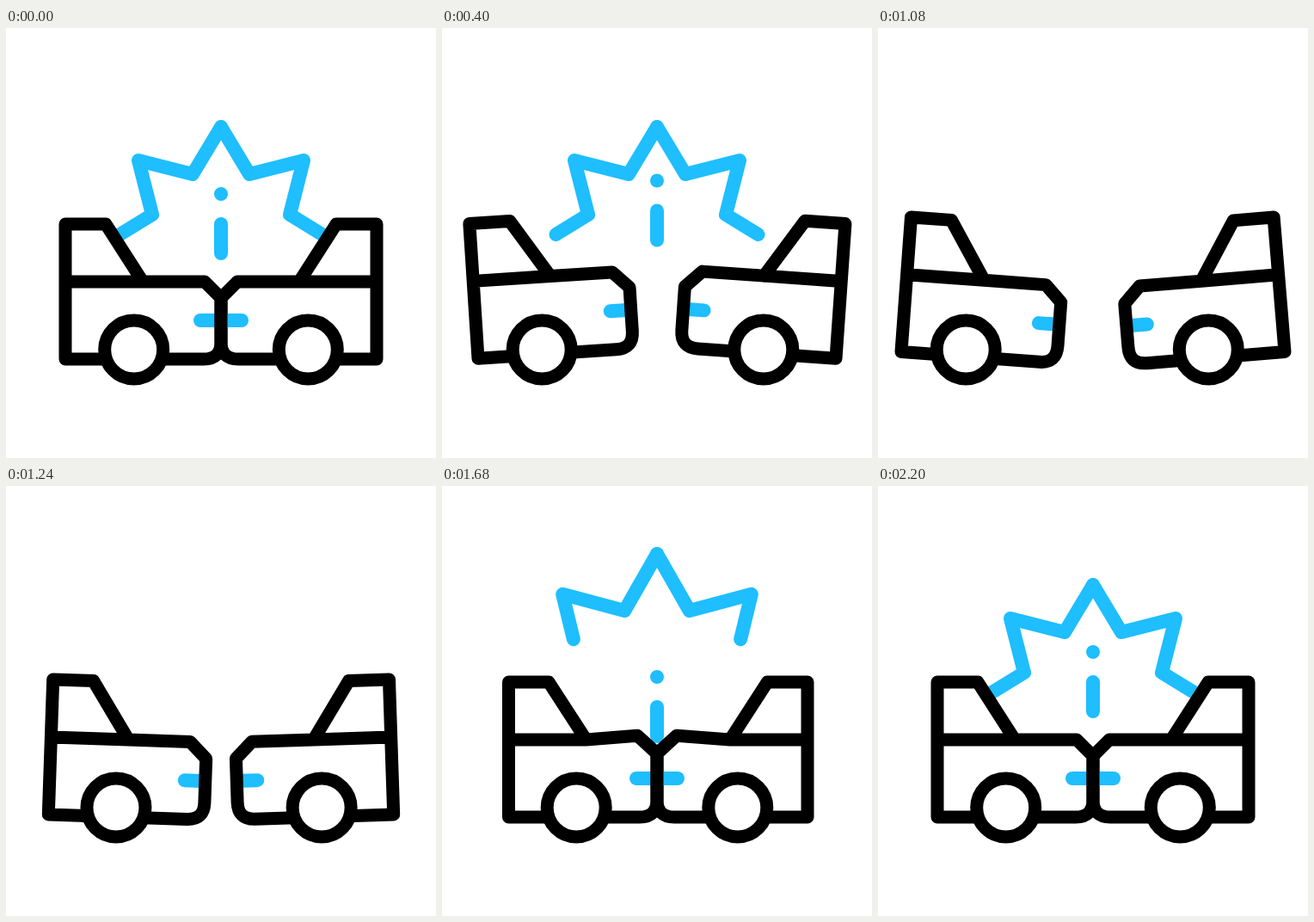
Write an HTML page that moves like this. It is 500 px wide and 500 px high and loops after 2400 ms.

```html
<!DOCTYPE html>
<html lang="en">
<head>
<meta charset="utf-8">
<title>Collision</title>
<style>
  html, body { margin: 0; width: 100%; height: 100%; overflow: hidden; background: #fff; }
  svg { display: block; width: 100vw; height: 100vh; }
  path, circle { fill: none; stroke-width: 15; stroke-linecap: round; stroke-linejoin: round; }
  .blue { stroke: #1ebeff; stroke-width: 16; }
  .black { stroke: #000; }
  .wheel { fill: #fff; }
</style>
</head>
<body>
<svg viewBox="0 0 500 500">
  <clipPath id="above"><rect width="500" height="312"/></clipPath>
  <path class="blue star" pathLength="1"/>
  <path class="blue star" pathLength="1" transform="translate(500) scale(-1 1)"/>
  <g clip-path="url(#above)">
    <path id="mark" class="blue" d="M250 193v.01M250 228v34"/>
  </g>
  <g class="car"></g>
  <g class="car" transform="translate(500) scale(-1 1)"></g>
</svg>
<script>
const LOOP = 2400, STEP = 40;

// Every track is at rest at both ends of its time span
const during = times => (...values) => times.map((t, i) => [t, values[i - 1] || 0]);
const drive = during([80, 400, 560, 720, 1080, 1200, 1320]);
const crash = during([1320, 1400, 1680, 2200]);

const lift = drive(.8, 2, 3, 8.5, 5);
const bend = crash(1, .95);
const jolt = crash(1, 0);
const wheelPush = crash(10.7, 7.5);
const motions = [
  {
    back: drive(27, 31.5, 29, 42, 30),
    angle: drive(3.7, 4.4, 4.6, -4.2, -3),
    wheelBack: drive(32.5, 36, 38.5, 46.5, 32),
    squash: crash(13.3, 8.5)
  },
  {
    back: drive(27, 33, 31, 42, 30),
    angle: drive(4, 4, 2.7, -4.7, -3),
    wheelBack: drive(22.5, 27, 27, 33, 24),
    squash: crash(7, 6)
  }
];
const starGrowth = during([1200, 1400, 1690, 2200])(.094, .2);
const markDrop = during([80, 400, 660, 1440, 1680, 1880, 2200])(-15.5, 130, 130, 29, -10);
// Half of the star, from the tip down, around (250, 295)
const starPoints = [[0, -180], [-33, -125], [-96, -141], [-80, -78], [-117.5, -55]];

// Smooth curve through the keys, flat at every peak
function track(keys, t) {
  const last = keys.length - 1;
  if (t <= keys[0][0] || t >= keys[last][0]) return 0;
  const i = keys.findIndex(k => k[0] > t) - 1;
  const [t0, v0] = keys[i], [t1, v1] = keys[i + 1];
  const rate = j => (keys[j + 1][1] - keys[j][1]) / (keys[j + 1][0] - keys[j][0]);
  const slope = j => {
    if (j === 0 || j === last) return 0;
    const a = rate(j - 1), b = rate(j);
    return a * b > 0 ? 2 * a * b / (a + b) : 0;
  };
  const h = t1 - t0, u = (t - t0) / h, v = 1 - u;
  return v * v * (1 + 2 * u) * v0 + u * u * (3 - 2 * u) * v1
    + h * u * v * (v * slope(i) - u * slope(i + 1));
}

function smooth(t, from, to) {
  const u = Math.min(1, Math.max(0, (t - from) / (to - from)));
  return u * u * (3 - 2 * u);
}

const stars = document.querySelectorAll(".star");
const mark = document.getElementById("mark");
const cars = [...document.querySelectorAll(".car")].map((g, i) => {
  g.innerHTML = `<g><path class="blue"/><path class="black"/></g>
    <circle class="black wheel" cx="148.7" cy="374" r="34"/>`;
  const [light, frame] = g.querySelectorAll("path");
  return { ...motions[i], body: g.firstChild, light, frame, wheel: g.querySelector("circle") };
});

function drawCar(car, t) {
  const squash = track(car.squash, t), fold = track(bend, t), shake = track(jolt, t);
  const rear = 69 + squash, pillar = 159 + squash;
  car.body.setAttribute("transform",
    `translate(${-track(car.back, t)} ${-track(lift, t)}) rotate(${-track(car.angle, t)} 69 385)`);
  car.light.setAttribute("d", `M${226 - 2 * shake} ${340 + 3 * shake}H245`);
  car.frame.setAttribute("d",
    `M${rear} 295H${pillar}L${231 - 4 * fold} ${295 - 5 * fold}L250 ${314 - 3 * fold}
     V365Q250 385 230 385H${rear}V228H${116 + squash * .95}L${pillar} 295`);
  car.wheel.setAttribute("transform", `translate(${track(wheelPush, t) - track(car.wheelBack, t)})`);
}

function drawStar(t) {
  const grow = track(starGrowth, t), sx = 1 + .72 * grow, sy = 1 + grow;
  const shown = t < 1000 ? 1 - smooth(t, 400, 750) : smooth(t, 1350, 1850);
  const d = "M" + starPoints.map(([x, y]) => `${250 + x * sx} ${295 + y * sy}`).join("L");
  for (const star of stars) {
    star.setAttribute("d", d);
    star.setAttribute("stroke-dasharray", shown < 1 ? `${shown} 3` : "none");
    star.style.visibility = shown > 0 ? "visible" : "hidden";
  }
}

function draw(now) {
  const t = Math.floor(now % LOOP / STEP) * STEP;
  const drop = track(markDrop, t);
  drawStar(t);
  mark.setAttribute("transform", `translate(0 ${drop})`);
  mark.style.visibility = drop < 129 ? "visible" : "hidden";
  cars.forEach(car => drawCar(car, t));
}

const start = performance.now();
function tick() {
  draw(performance.now() - start);
  requestAnimationFrame(tick);
}
tick();
</script>
</body>
</html>
```
